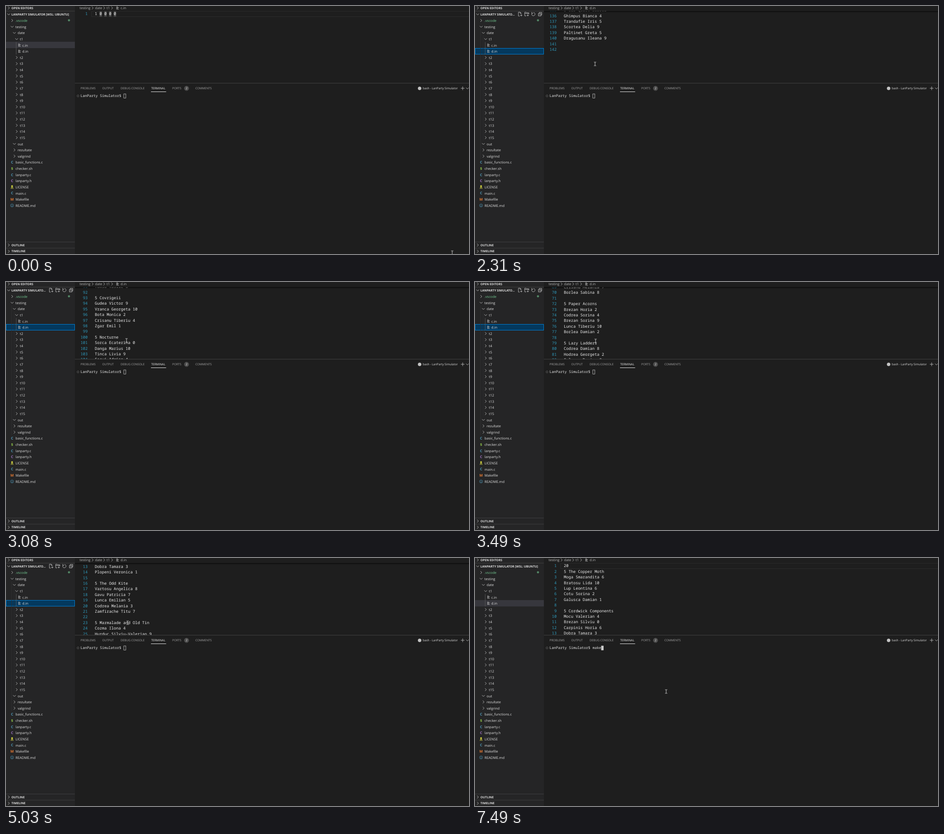
Write an HTML page that moves like this. It is 1022 by 548 pixels and loops after 8 s.

```html
<!DOCTYPE html>
<html lang="en">
<head>
<meta charset="utf-8">
<title>Editor session</title>
<style>
  html, body { margin: 0; width: 100%; height: 100%; overflow: hidden; background: #1e1e1e; }
  svg { display: block; width: 1022px; height: 548px; }
  text { font: 7.6px "Open Sans", "Noto Sans", sans-serif; fill: #dedede; text-rendering: geometricPrecision; white-space: pre; }
  .head { font-size: 6.65px; font-weight: 700; }
  .tab { font-size: 6.45px; fill: #a6a6a6; }
  .on { fill: #f0f0f0; }
  .code, .num { font: 8.73px "Noto Sans Mono", "DejaVu Sans Mono", monospace; fill: #ececec; }
  .num { fill: #2f9bbd; text-anchor: end; }
  .term { font: 7.9px "Noto Sans Mono", "DejaVu Sans Mono", monospace; fill: #e6e6e6; }
  .line { fill: none; stroke: #c5c5c5; stroke-width: .9; }
</style>
</head>
<body>
<script>
const LOOP = 8000, LINE = 12.4, ROW = 13.625, CHAR = 5.24, TERM_CHAR = 4.74;

function el(tag, attrs, parent, content) {
  const node = document.createElementNS('http://www.w3.org/2000/svg', tag);
  for (const key in attrs) node.setAttribute(key, attrs[key]);
  if (content !== undefined) node.textContent = content;
  parent.appendChild(node);
  return node;
}
const svg = el('svg', { viewBox: '0 0 1022 548' }, document.body);
const group = (parent = svg, attrs = {}) => el('g', attrs, parent);
const rect = (x, y, width, height, fill, parent = svg) => el('rect', { x, y, width, height, fill }, parent);
const text = (x, y, str, cls = '', parent = svg) => el('text', { x, y, class: cls }, parent, str);
const line = (d, parent = svg, extra = {}) => el('path', { d, class: 'line', ...extra }, parent);
const chevron = (x, y, down, parent = svg) =>
  line(down ? `M${x - 3} ${y - 1.4}l3 3l3 -3` : `M${x - 1.4} ${y - 3}l3 3l-3 3`, parent);
const fileIcon = (x, y, parent = svg) =>
  line(`M${x} ${y - 2.6}h3.5M${x} ${y - .9}h5.5M${x} ${y + .8}h3.5M${x} ${y + 2.5}h5.5`, parent, { 'stroke-width': .8 });
const show = (node, on) => { node.style.display = on ? '' : 'none'; };

// ---- Sidebar ----
rect(0, 0, 152, 548, '#252526');
const rowY = i => 32 + ROW * i;
const labelY = i => rowY(i) + 3.1;
const hoverRow = rect(0, 0, 152, ROW, '#2a2d2e');
const pickedRow = el('rect', { x: .5, width: 151, height: 13 }, svg);

const guides = group();
line(`M12.5 ${rowY(1.5)}V${rowY(22.5)}M18 ${rowY(2.5)}V${rowY(19.5)}`, guides, { style: 'stroke:#303031' });
line(`M22.5 ${rowY(3.5)}V${rowY(5.5)}`, svg, { style: 'stroke:#585858' });

for (const y of [11.2, 521.4, 535]) rect(0, y - .4, 152, .8, '#474748');
function section(y, title, down) {
  chevron(6, y, down);
  return text(12, y + 2.4, title, 'head');
}
section(4.3, 'OPEN EDITORS');
const project = section(18.2, '', true);
section(528.2, 'OUTLINE');
section(542, 'TIMELINE');

const tools = group();
line('M102 17v-1.2l-2.2-2.2h-4v8.6h3M99.6 13.8v2.4h2.4M100 20.6h4.4M102.2 18.4v4.4', tools);
line('M113 21.8h-3.2v-8h3l1.2 1.2h4.8v3M109.8 16.4h9M114.4 20.6h4.4M116.6 18.4v4.4', tools);
line('M126 15.6a3.7 3.7 0 1 0 3-1.3M125.4 13.4v2.8h2.8', tools);
line('M140 16.4h5.6v5.6h-5.6zM141.8 16v-1.8h5.6v5.6h-1.6M141.4 19.2h2.8', tools);

const folder = (i, depth, name, down) => {
  const x = 13.5 + depth * 5;
  chevron(x, rowY(i), down);
  return text(x + 7.3, labelY(i), name);
};
folder(0, 0, '.vscode').style.fill = '#73c991';
el('circle', { cx: 139, cy: 31.6, r: 2.4, fill: '#73c991', opacity: .6 }, svg);
folder(1, 0, 'testing', true);
folder(2, 1, 'date', true);
folder(3, 2, 't1', true);
['c.in', 'd.in'].forEach((name, k) => {
  fileIcon(27, rowY(4 + k));
  text(36, labelY(4 + k), name);
});
for (let k = 2; k <= 15; k++) folder(k + 4, 2, 't' + k);
folder(20, 1, 'out', true);
folder(21, 1, 'rezultate');
folder(22, 1, 'valgrind');

const files = [
  ['basic_functions.c', 'C', '#519aba'], ['checker.sh', '$', '#8dc149'],
  ['lanparty.c', 'C', '#519aba'], ['lanparty.h', 'C', '#a074c4'],
  ['LICENSE', '', '#cbcb41'], ['main.c', 'C', '#519aba'],
  ['Makefile', 'M', '#e37933'], ['README.md', 'i', '#519aba']
];
files.forEach(([name, letter, color], k) => {
  const y = rowY(23 + k);
  text(21, labelY(23 + k), name);
  if (!letter) {
    el('circle', { cx: 13.4, cy: y - 1.8, r: 2, fill: color }, svg);
    line(`M12.6 ${y}l-1.2 4M14.2 ${y}l1.2 4`, svg, { style: `stroke:${color};stroke-width:1.5` });
    return;
  }
  const info = letter === 'i';
  if (info) el('circle', { cx: 13.4, cy: y, r: 3.3, fill: 'none', stroke: color, 'stroke-width': .8 }, svg);
  const mark = text(13.4, y + (info ? 2.1 : 2.9), letter);
  mark.style.cssText = `fill:${color};text-anchor:middle;font-weight:700;font-size:${info ? 5.5 : 7.8}px`;
});

// ---- Editor ----
const clip = el('clipPath', { id: 'pane' }, el('defs', {}, svg));
rect(152, 11.2, 870, 159, '#000', clip);
const pane = group(svg, { 'clip-path': 'url(#pane)' });
const lineY = n => 17.4 + LINE * (n - 1);
const codeLine = (n, str, parent) => {
  text(180.2, lineY(n) + 2.9, n, 'num', parent);
  if (str) text(196, lineY(n) + 2.9, str, 'code', parent);
};
const currentLine = parent =>
  el('rect', { x: 189, y: 11.6, width: 840, height: 12, fill: 'none', stroke: '#2b2b2b', 'stroke-width': 1.2 }, parent);

const shortDoc = group(pane);
currentLine(shortDoc);
for (let k = 1; k <= 4; k++) rect(196 + CHAR * 2 * k, 11.6, CHAR, 12, '#4a4a4a', shortDoc);
codeLine(1, '1 0 0 0 0', shortDoc);

const passages = {
  1: `20
5 The Copper Moth
Moga Smarandita 6
Bratosu Lida 10
Lup Leontina 6
Cotu Sorina 2
Galusca Damian 1

5 Cordwick Components
Mocu Valerian 4
Brezan Silviu 0
Carpinis Horia 6
Dobra Tamara 3
Plopeni Veronica 1

5 The Odd Kite
Vartosu Angelica 8
Gavu Patricia 7
Lunca Emilian 5
Codrea Melania 3
Zamfirache Titu 7

5 Marmalade and Old Tin
Cozma Ilona 4
Hurduc Silviu-Valerian 9`,
  38: `Sasca Flora-Margareta 6
Borlea Sabina 0
Tatar Laurentiu-Horia 10
Bej Melinda 3
Cotruc Marcel 10

5 The Wandering Oaks
Gora Olga-Lidia 10
Bistrican Daciana 7
Hodrea Sabina-Lidia 10
Covaz Traian 3
Prislop Margareta-Lidia 7`,
  91: `Tomsa Vasile 6

5 Covrigeii
Gudea Victor 9
Vranca Georgeta 10
Bota Monica 2
Crisanu Tiberiu 4
Zgar Emil 1

5 Nocturne
Sorca Ecaterina 0
Danga Marius 10
Tinca Livia 9
Secui Adrian 4`,
  135: `5 Our Quiet Barrel
Ghimpus Bianca 4
Trandafie Iris 5
Scortea Delia 9
Paltinet Greta 5
Dragusanu Ileana 9`
};
const doc = [];
for (const start in passages)
  passages[start].split('\n').forEach((str, k) => { doc[+start + k] = str; });

let seed = 7;
const pick = list => {
  seed = (seed * 16807) % 2147483647;
  return list[seed % list.length];
};
const words = str => str.split(' ');
const surnames = words('Brezan Lunca Codrea Mocu Hodrea Galusca Vranca Crisanu Borlea Carpinis Dobra');
const given = words('Silviu Sorina Horia Melania Damian Livia Marcel Sabina Tiberiu Georgeta Greta');
const teamA = words('Paper Velvet Lazy Hollow Amber Crooked');
const teamB = words('Acorns Teapots Badgers Pebbles Ladders');
const scores = [...Array(11).keys()];

const longDoc = group(pane);
const firstLine = currentLine(longDoc);
for (let n = 1; n <= 142; n++) {
  const slot = (n + 5) % 7;
  if (doc[n] === undefined) {
    doc[n] = n > 140 || slot === 6 ? ''
      : slot === 0 ? `5 ${pick(teamA)} ${pick(teamB)}`
      : `${pick(surnames)} ${pick(given)} ${pick(scores)}`;
  }
  codeLine(n, doc[n], longDoc);
}
const shade = group(pane);
[.75, .45, .2].forEach((opacity, k) => rect(152, 11.2 + k, 870, 1, '#000', shade).setAttribute('opacity', opacity));

[['testing', 162.5, 191], ['date', 196.5, 216.5], ['t1', 222, 234]].forEach(([name, x, arrow]) => {
  text(x, 7.4, name).style.fill = '#b4b4b4';
  chevron(arrow, 4.4);
});
fileIcon(243.5, 4.4);
const crumb = text(253, 7.4, '');
crumb.style.fill = '#b4b4b4';

// ---- Panel ----
rect(152, 170, 870, 1, '#414141');
[['PROBLEMS', 164.5], ['OUTPUT', 212.5], ['DEBUG CONSOLE', 253], ['TERMINAL', 320.5], ['PORTS', 367], ['COMMENTS', 418]]
  .forEach(([name, x]) => text(x, 184.3, name, name === 'TERMINAL' ? 'tab on' : 'tab'));
rect(320, 189, 33.5, 1, '#e7e7e7');
el('circle', { cx: 398.5, cy: 182, r: 5.4, fill: '#4d4d4d' }, svg);
text(396.7, 184.3, '2', 'tab on');
el('circle', { cx: 913, cy: 182, r: 3.8, fill: '#c5c5c5' }, svg);
text(920, 184.4, 'bash - LanParty Simulator', 'tab').style.fill = '#dedede';
line('M1004 181.8h8M1008 177.8v8');
chevron(1018.5, 181.8, true);

el('circle', { cx: 159, cy: 198.7, r: 2.2, fill: 'none', stroke: '#6b6b6b', 'stroke-width': .8 }, svg);
text(164.6, 201.4, 'LanParty Simulator$', 'term');
const typed = text(259.6, 201.4, '', 'term');
const caret = el('rect', { y: 194.2, width: 4.4, height: 9.3, stroke: '#ccc', 'stroke-width': .8 }, svg);

// ---- Pointer ----
const beam = line('M-2.4 -4h1.7l.7 .6l.7 -.6h1.7M0 -3.4V3.4M-2.4 4h1.7l.7 -.6l.7 .6h1.7', svg, { style: 'stroke:#e4e4e4' });
const hand = el('path', {
  d: 'M-1.5 1.2Q-1.5 0 -.4 0Q.7 0 .7 1.2V4.6Q1.9 4 2.4 5Q3.6 4.6 4 5.6Q5.3 5.3 5.4 6.8V9Q5.4 11 4.4 12.8H-1.2Q-2 11 -4 8Q-3.6 6.6 -1.5 8Z',
  fill: '#fff', stroke: '#000', 'stroke-width': .7
}, svg);

// ---- Timeline ----
const path = [
  [0, 985, 545], [30, 985, 545], [620, 85, 85], [1120, 85, 85], [1300, 85.5, 99.5], [2030, 85.5, 99.5],
  [2270, 265, 128], [2970, 265, 128], [3080, 266, 129], [3420, 266, 129], [3820, 268.5, 142],
  [5030, 268.5, 143], [5620, 268.5, 143], [6060, 422, 295], [LOOP, 422, 295]
];
const scrollSteps = [
  [0, 141], [2280, 139.5], [2310, 134.66], [2340, 129.5], [2370, 125.3], [2400, 122.6],
  [2700, 117.5], [2770, 111], [2970, 107], [3010, 102], [3040, 96.5], [3080, 90.57], [3110, 86.5], [3150, 84.2],
  [3420, 78.5], [3450, 73], [3490, 68.5], [3750, 63], [3780, 57.5], [3820, 52.8], [4090, 44], [4130, 37.05],
  [4430, 32], [4470, 26], [4500, 21.9], [4760, 16.5], [5030, 11.87], [5070, 6.9], [5100, 2.5], [5140, 0]
];
const OPENED = 1710, FOCUS_TREE = 880, FOCUS_TERMINAL = 6060;
const keyTimes = [7160, 7270, 7380, 7490];

function pointerAt(t) {
  const i = path.findIndex((p, k) => k && t <= p[0]);
  const [t0, x0, y0] = path[i - 1], [t1, x1, y1] = path[i];
  const u = (t - t0) / (t1 - t0), e = u * u * (3 - 2 * u);
  return [x0 + (x1 - x0) * e, y0 + (y1 - y0) * e];
}

function render(t) {
  const [x, y] = pointerAt(t);
  const inTree = x < 152, opened = t >= OPENED;
  const treeFocus = t >= FOCUS_TREE && t < FOCUS_TERMINAL;
  const active = inTree || treeFocus;

  show(beam, !inTree);
  show(hand, inTree);
  (inTree ? hand : beam).setAttribute('transform', `translate(${x} ${y})`);

  project.textContent = active ? 'LANPARTY SIMULATO...' : 'LANPARTY SIMULATOR [WSL: UBUNTU]';
  show(tools, active);
  show(guides, active);
  show(hoverRow, inTree);
  hoverRow.setAttribute('y', rowY(Math.round((y - rowY(0)) / ROW) - .5));
  // Whole pixels keep the selection border sharp.
  pickedRow.setAttribute('y', Math.floor(rowY(opened ? 4.5 : 3.5)) + .5);
  pickedRow.setAttribute('fill', treeFocus ? '#04395e' : '#37373d');
  pickedRow.setAttribute('stroke', treeFocus ? '#007fd4' : '#37373d');

  const scroll = scrollSteps.findLast(s => s[0] <= t)[1];
  show(shortDoc, !opened);
  show(longDoc, opened);
  show(firstLine, scroll === 0);
  show(shade, opened && scroll > 0);
  longDoc.setAttribute('transform', `translate(0 ${-scroll * LINE})`);
  crumb.textContent = opened ? 'd.in' : 'c.in';

  const count = keyTimes.filter(k => k <= t).length;
  typed.textContent = 'make'.slice(0, count);
  caret.setAttribute('x', 260 + count * TERM_CHAR);
  caret.setAttribute('fill', t >= FOCUS_TERMINAL ? '#ccc' : 'none');
}

const start = performance.now();
function tick() {
  render((performance.now() - start) % LOOP);
  requestAnimationFrame(tick);
}
tick();
</script>
</body>
</html>
```
